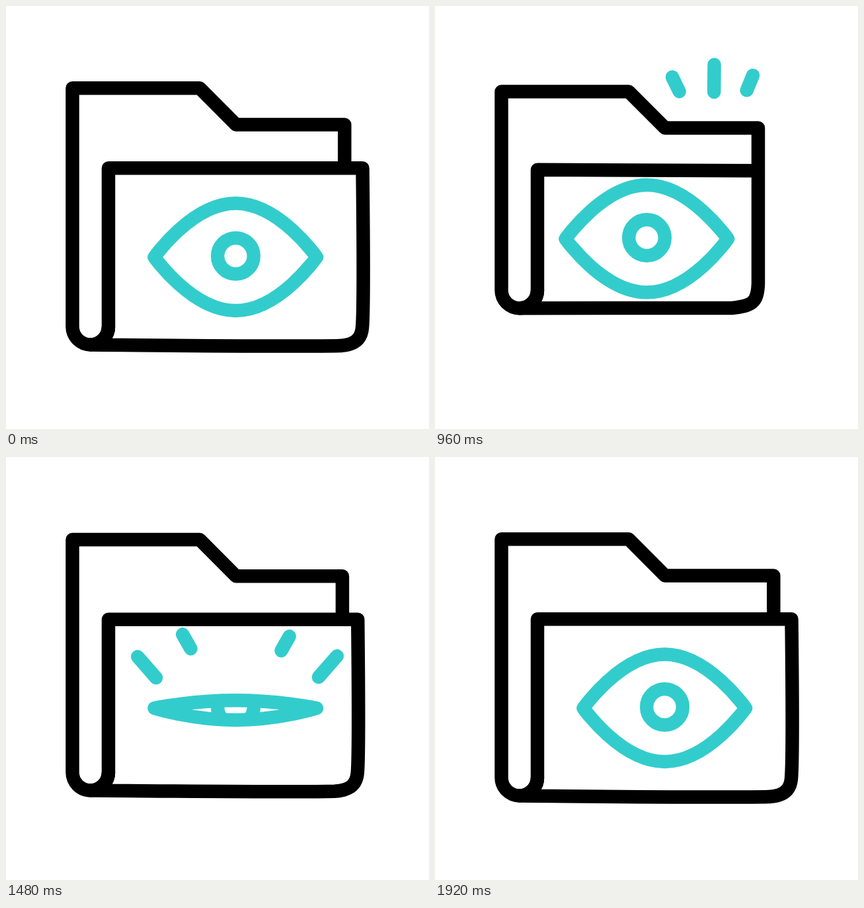
Animation, 640 px wide and 640 px high, one loop 2.38 s. Source, as an HTML page:

```html
<!DOCTYPE html>
<html lang="en">
<head>
<meta charset="utf-8">
<title>Folder with eye</title>
<style>
  html, body { margin: 0; width: 100%; height: 100%; overflow: hidden; background: #fff; }
  svg { display: block; width: 100vw; height: 100vh; }
  svg * { fill: none; stroke-width: 20.5; stroke-linecap: round; stroke-linejoin: round; }
  .ink { stroke: #000; }
  .teal { stroke: #3cc; }
</style>
</head>
<body>
<svg viewBox="0 0 640 640">
  <defs><clipPath id="lids"><path id="lidShape"/></clipPath></defs>
  <path id="back" class="ink" style="stroke-linecap: butt"/>
  <path id="front" class="ink"/>
  <g id="eye" class="teal">
    <g clip-path="url(#lids)"><circle cx="347.5" cy="378.2" r="27.3"/></g>
    <path id="lidLine"/>
  </g>
  <g id="rays" class="teal"></g>
</svg>
<script>
const STEP = 20, LOOP = 2380;
const $ = id => document.getElementById(id);
const clamp = x => Math.min(1, Math.max(0, x));
const span = (f, a, b) => clamp((f - a) / (b - a));
const smooth = (f, a, b) => { const s = span(f, a, b); return s * s * (3 - 2 * s); };
const easeOut = (f, a, b) => 1 - (1 - span(f, a, b)) ** 1.4;
const mix = (a, b, k) => a + (b - a) * k;

// Numbers in path a move towards those in path b
const NUM = /\d+(\.\d+)?/g;
function morph(a, b, k) {
  const ends = b.match(NUM);
  let i = 0;
  return a.replace(NUM, n => mix(+n, +ends[i++], k).toFixed(2));
}

const back = [
  'M155 485 C155 500.1 142.8 512.4 127.8 512.4 C112.7 512.4 100.5 500.1 100.5 485 L100.5 124.3 L293 124.3 L348 179.5 L512.3 179.5 L512.3 245',
  'M155 430 C155 445.1 142.8 457.3 127.8 457.3 C112.7 457.3 100.5 445.1 100.5 430 L100.5 129.4 L293 129.4 L348 184.6 L489 184.6 L489 249'
];
const front = [
  'M155 485 L155 245.3 L539.5 245.3 C540.5 340 542 455 539 487 C537.5 504 527 513 505 514 C450 515.7 350 514.5 128 512.5 C142.8 512.4 155 500.1 155 485 Z',
  'M155 430 L155 247.8 L489 249.2 C489 320 489.5 385 489 420 C488 450 479 453.5 449 457 C400 457 300 456.7 128 457.2 C142.8 457.3 155 445.1 155 430 Z'
];

// Base point, far point, frames for the tip, frames for the tail
const rays = [
  [383, 157, 359, 107.5, 33, 45, 41, 54],
  [422, 157, 422.5, 88.8, 35, 47, 42, 56],
  [460, 156, 481, 105, 33, 45, 41, 54],
  [227, 334, 193, 295, 66, 77, 75, 84],
  [279.5, 290, 264.5, 263.5, 66, 77, 75, 84],
  [416.5, 293, 431.5, 266.5, 66, 77, 75, 84],
  [473, 333, 507, 294, 66, 77, 75, 84]
].map(r => {
  const line = document.createElementNS('http://www.w3.org/2000/svg', 'path');
  $('rays').append(line);
  return { r, line };
});

function drawRay({ r: [x0, y0, x1, y1, a, b, c, d], line }, f) {
  const tip = smooth(f, a, b), tail = smooth(f, c, d);
  const at = k => `${mix(x0, x1, k)} ${mix(y0, y1, k)}`;
  line.setAttribute('d', tip > tail ? `M${at(tail)}L${at(tip)}` : '');
}

function lids(open) {
  const shut = 383.8;
  const top = mix(shut, 298.5, open), low = mix(shut, 461, open);
  return `M224.5 380 C224.5 380 281.5 ${top} 347.5 ${top} S470 380 470 380 ` +
    `C470 380 413.5 ${low} 347.5 ${low} S224.5 380 224.5 380 Z`;
}

function draw(f) {
  const squash = easeOut(f, 30, 40) - easeOut(f, 50, 82);
  $('back').setAttribute('d', morph(...back, squash));
  $('front').setAttribute('d', morph(...front, squash));

  const shift = smooth(f, 30, 40) - smooth(f, 50, 70);
  $('eye').setAttribute('transform', `translate(${-27 * shift} ${-27.7 * shift})`);

  const open = 1 - smooth(f, 66, 77) + smooth(f, 81.8, 96);
  const shape = lids(open);
  $('lidShape').setAttribute('d', shape);
  $('lidLine').setAttribute('d', shape);

  rays.forEach(ray => drawRay(ray, f));
}

function tick() {
  draw(Math.floor(performance.now() % LOOP / STEP));
  requestAnimationFrame(tick);
}
tick();
</script>
</body>
</html>
```
